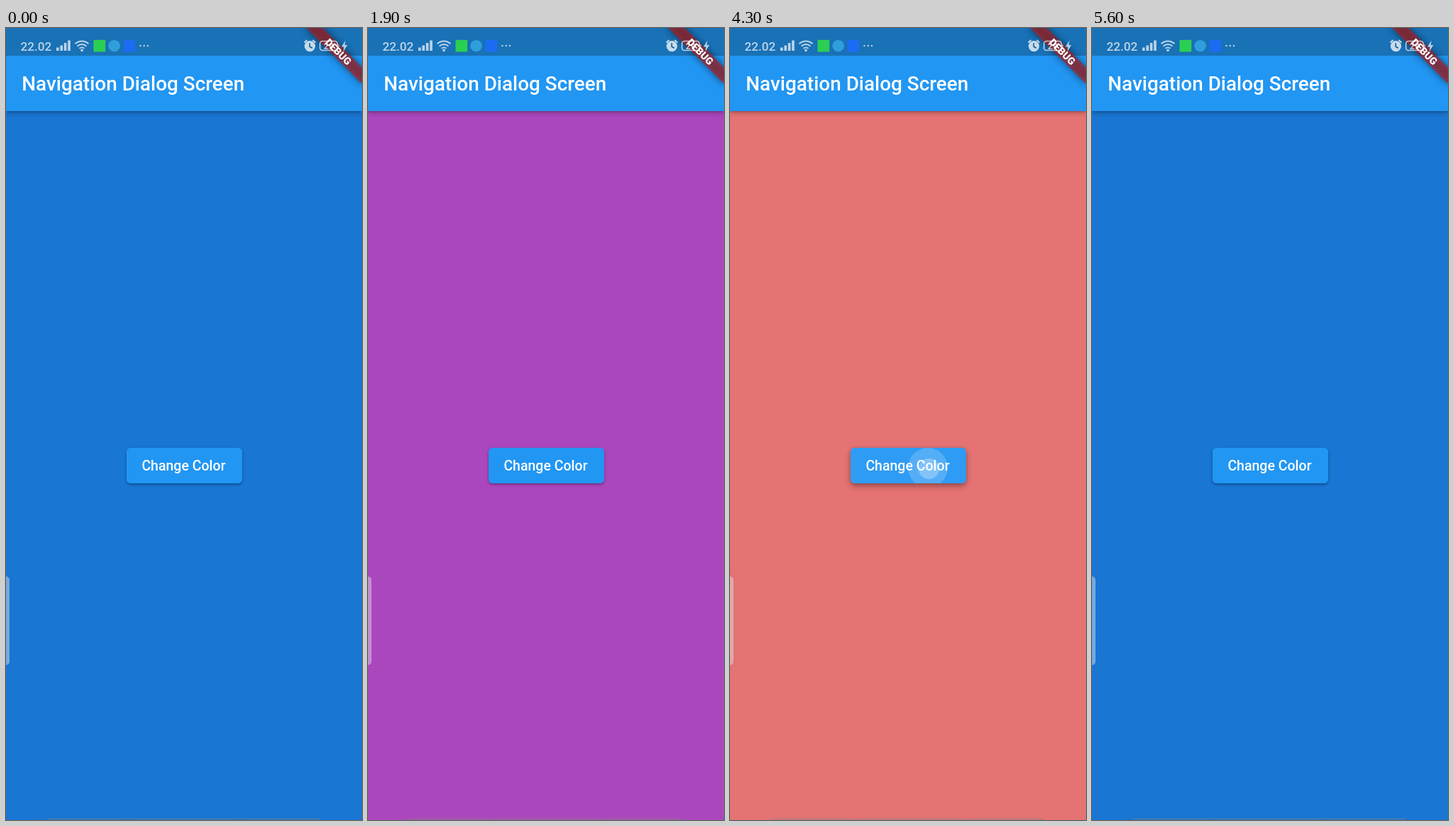
These frames come from a looping animation (502 by 1115 pixels, 5.7 s). An HTML page:

```html
<!DOCTYPE html>
<html lang="en">
<head>
<meta charset="utf-8">
<title>Navigation dialog</title>
<style>
  html, body { margin: 0; width: 100%; height: 100%; overflow: hidden; }
  #stage { position: absolute; left: 0; top: 0; width: 502px; height: 1115px; overflow: hidden; }
  #stage div, svg { position: absolute; }
  svg { left: 0; top: 0; overflow: visible; }
  text { font-family: Roboto, sans-serif; font-weight: 500; }
  .title { font-size: 27.9px; }
  .body { font-size: 22.3px; font-weight: 400; }
  .label { font-size: 19.5px; }
  #bar { left: 0; top: 0; width: 502px; height: 117px; background: #2196f3;
    box-shadow: 0 2px 7px rgba(0,0,0,.3), 0 1px 2px rgba(0,0,0,.15); }
  #status { left: 0; top: 0; width: 502px; height: 39px; background: rgba(0,0,0,.25); }
  #button, #buttonShadow { left: 169.7px; top: 591px; width: 163px; height: 50.2px; border-radius: 5.6px; }
  #button { background: #2196f3; overflow: hidden; }
  #buttonShadow { box-shadow: 0 2px 3px rgba(0,0,0,.25), 0 1px 5px rgba(0,0,0,.12); }
  #buttonShadow.pressed { box-shadow: 0 4px 8px rgba(0,0,0,.32), 0 1px 4px rgba(0,0,0,.12); }
  #press { inset: 0; background: rgba(255,255,255,.06); }
  #ripple { border-radius: 50%; background: rgba(255,255,255,.18); }
  #barrier { inset: 0; background: #000; }
  #dialog { inset: 0; }
  #card { left: 56px; top: 456px; width: 390px; height: 242px; border-radius: 5.6px; background: #fff;
    box-shadow: 0 15px 21px -10px #0003, 0 33px 53px 4px #00000024, 0 12.5px 64px 11px #0000001f; }
  #mark { top: 628px; height: 50px; border-radius: 5.6px; background: rgba(33,120,200,.25); }
  #dot { width: 29px; height: 29px; border-radius: 50%; background: rgba(255,255,255,.28); }
  #handle { left: -6px; top: 772px; width: 11px; height: 125px; border-radius: 5px;
    background: rgba(225,230,235,.45); box-shadow: 0 0 1px rgba(0,0,0,.3); }
</style>
</head>
<body>
<div id="stage">
  <div id="bar"></div>
  <div id="status"></div>
  <div id="buttonShadow"></div>
  <div id="button"><div id="press"></div><div id="ripple"></div></div>
  <svg width="502" height="1115" fill="#fff">
    <text class="title" x="22.3" y="88">Navigation Dialog Screen</text>
    <text class="label" x="191.4" y="623">Change Color</text>
  </svg>

  <div id="barrier"></div>
  <div id="dialog">
    <div id="card"></div>
    <div id="mark"></div>
    <svg width="502" height="1115" fill="#212121">
      <text class="title" x="89.3" y="515.5">Very important question</text>
      <text class="body" x="89.3" y="570">Please choode a color</text>
      <g class="label" fill="#2196f3">
        <text x="148.6" y="660.5">Red soft</text>
        <text x="290" y="660.5" text-anchor="middle">Purple</text>
        <text x="390.5" y="660.5" text-anchor="middle">Blue</text>
      </g>
    </svg>
  </div>

  <div id="handle"></div>
  <svg width="502" height="1115">
    <defs>
      <filter id="soft" x="-30%" y="-150%" width="160%" height="400%"><feGaussianBlur stdDeviation="5.5"/></filter>
    </defs>
    <g transform="translate(502 0) rotate(45)">
      <rect x="-55.8" y="39" width="111.6" height="16.7" opacity=".5" filter="url(#soft)"/>
      <rect x="-55.8" y="39" width="111.6" height="16.7" fill="#b71c1c" fill-opacity=".627"/>
      <text x="0" y="52.4" fill="#fff" text-anchor="middle" style="font-size:14.2px;font-weight:900">DEBUG</text>
    </g>
    <path fill="#808080" opacity=".28"
      d="M58 1115v-2q0-1 2-1H171v3zM173 1112H329v3H173zM331 1112H441q2 0 2 1v2H331z"/>
    <g fill="#fff" opacity=".7">
      <text x="20.5" y="31.5" style="font-size:17.2px">22.02</text>
      <path d="M71 27.5h3.6v4.5h-3.6zM76.4 24.5h3.6v7.5h-3.6zM81.8 21h3.6v11h-3.6zM87.2 17.5h3.6v14.5h-3.6z"/>
      <g fill="none" stroke="#fff" stroke-width="2">
        <path d="M97.6 22.2a13.5 13.5 0 0 1 18.8 0M100.6 25.7a9 9 0 0 1 12.8 0M103.5 28.9a5 5 0 0 1 7 0"/>
        <rect x="442.7" y="18.5" width="24.5" height="13" rx="3.5" stroke-width="1.6"/>
      </g>
      <circle cx="107" cy="31.4" r="1.8"/>
      <circle cx="189.5" cy="25" r="1.2"/><circle cx="194.8" cy="25" r="1.2"/><circle cx="200" cy="25" r="1.2"/>
      <path d="M468.4 22.5q1.5 .5 1.5 2.5t-1.5 2.5z"/>
      <text x="455" y="29.5" text-anchor="middle" style="font-size:12px;font-weight:700">29</text>
      <path d="M478.8 17.5L473 26.5h3.6L475.6 33.5L481.3 24h-3.7z"/>
    </g>
    <g opacity=".75" fill="none" stroke="#fff">
      <circle cx="428.5" cy="25.6" r="7.6" fill="#fff" stroke="none"/>
      <path stroke-width="2" d="M420.6 20.4l4-3.4M436.4 20.4l-4-3.4"/>
      <path stroke="#1b4f7c" stroke-width="1.6" d="M428.3 21.3v5l3.7 2"/>
    </g>
    <rect x="123.5" y="16.8" width="16.7" height="16.7" fill="#2bcf52"/>
    <circle cx="152.6" cy="25.2" r="8.3" fill="#2f9fdc"/>
    <rect x="165.5" y="16.8" width="16.7" height="16.7" fill="#1b6cf2"/>
  </svg>
  <div id="dot"></div>
</div>

<script>
const LOOP = 5700;
const BLUE = '#1976d2', PURPLE = '#ab47bc', RED = '#e57373';
const $ = id => document.getElementById(id);

// Touch points, and the action-button span each one lights up
const TAPS = {
  change: { x: 280.5, y: 620 },
  red: { x: 198.5, y: 673, left: 138, width: 97 },
  purple: { x: 292, y: 662, left: 246, width: 90 },
  blue: { x: 415, y: 658, left: 347, width: 89 }
};

// start ms, page colour, dialog opacity, barrier opacity, touch, ripple radius / highlight
const STEPS = [
  [0, BLUE, 0, 0],
  [400, BLUE, 0, 0, 'change', 14],
  [500, BLUE, 0, 0, 'change', 28],
  [600, BLUE, .65, .32, 'change', 36],
  [700, BLUE, 1, .54],
  [1600, BLUE, 1, .54, 'purple', 0],
  [1700, BLUE, 1, .54, 'purple', 1],
  [1800, PURPLE, .4, .22, 'purple', 1],
  [1900, PURPLE, 0, 0],
  [2500, PURPLE, 0, 0, 'change', 0],
  [2600, PURPLE, 0, 0, 'change', 14],
  [2700, PURPLE, 0, 0, 'change', 28],
  [2800, PURPLE, .65, .32],
  [2900, PURPLE, 1, .54],
  [3200, PURPLE, 1, .54, 'red', 0],
  [3300, PURPLE, 1, .54, 'red', 1],
  [3400, RED, .36, .19, 'red', 1],
  [3500, RED, .06, .03],
  [3600, RED, 0, 0],
  [4100, RED, 0, 0, 'change', 0],
  [4200, RED, 0, 0, 'change', 14],
  [4300, RED, 0, 0, 'change', 28],
  [4400, RED, .65, .32],
  [4500, RED, 1, .54],
  [4900, RED, 1, .54, 'blue', 0],
  [5000, RED, 1, .54, 'blue', 1],
  [5100, BLUE, .51, .31, 'blue', 1],
  [5200, BLUE, 0, 0]
];

function show(el, on) { el.style.visibility = on ? 'visible' : 'hidden'; }

function circle(el, x, y, r) {
  Object.assign(el.style, {
    left: x - r + 'px', top: y - r + 'px', width: 2 * r + 'px', height: 2 * r + 'px'
  });
}

function draw(t) {
  const [, colour, dialog, barrier, tapName, amount = 0] = STEPS.filter(s => s[0] <= t).pop();
  const tap = TAPS[tapName];
  const onButton = tapName === 'change' && amount > 0;
  const onAction = tap && tap.width && amount > 0;

  $('stage').style.background = colour;
  $('dialog').style.opacity = dialog;
  $('barrier').style.opacity = barrier;

  show($('dot'), tap);
  if (tap) circle($('dot'), tap.x, tap.y, 14.5);

  $('buttonShadow').classList.toggle('pressed', onButton);
  show($('press'), onButton);
  show($('ripple'), onButton);
  if (onButton) circle($('ripple'), 279 - 169.7, 619 - 591, amount);

  show($('mark'), onAction);
  if (onAction) {
    $('mark').style.left = tap.left + 'px';
    $('mark').style.width = tap.width + 'px';
  }
}

const start = performance.now();
function tick() {
  draw((performance.now() - start) % LOOP);
  requestAnimationFrame(tick);
}
tick();
</script>
</body>
</html>
```
